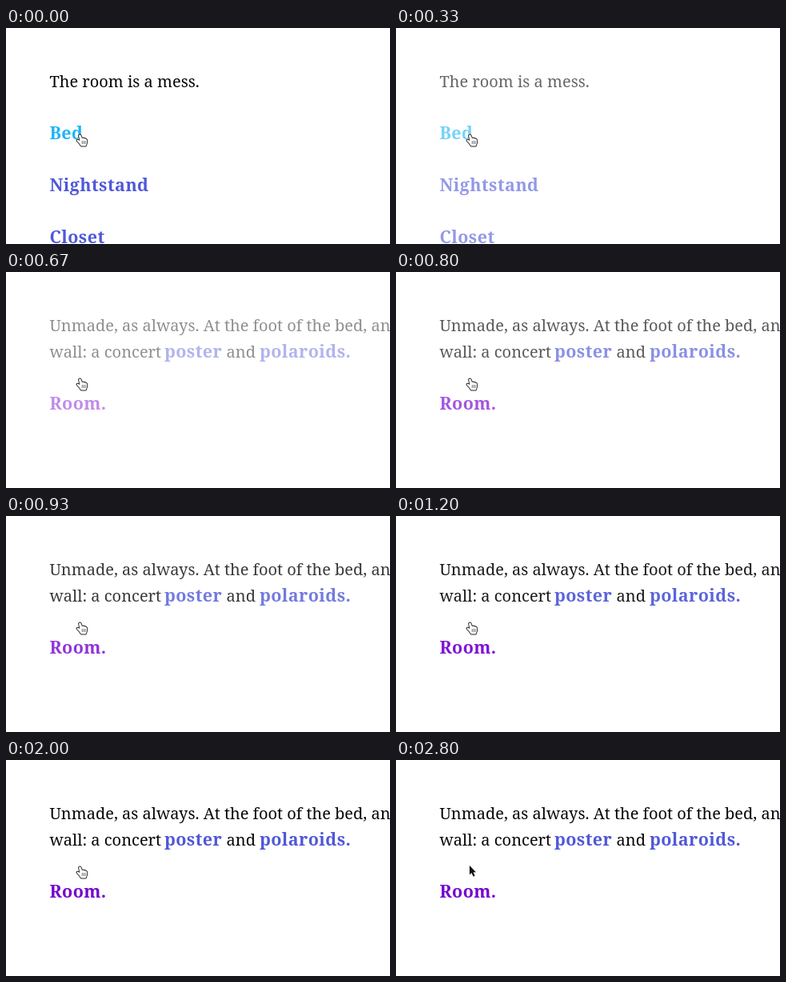
An HTML page with a canvas for the animation above (3.07 s loop, 480 by 270 pixels).

```html
<!DOCTYPE html>
<html lang="en">
<head>
<meta charset="utf-8">
<style>
html, body { margin: 0; width: 100%; height: 100%; overflow: hidden; background: #fff; }
canvas { display: block; }
</style>
</head>
<body>
<canvas id="stage" width="480" height="270"></canvas>
<script>
const ctx = document.getElementById("stage").getContext("2d");
const LOOP = 3070, STEP = 1000 / 15;
const BLACK = "#060606", BLUE = "#4f58d8", HOVER = "#1fb4f4", VISITED = "#7400d0";

// Each run: text, x, baseline, colour; coloured runs are bold links.
const roomPage = [
  ["The room is a mess.", 54.5, 74, BLACK],
  ["Bed", 54.5, 139, HOVER],
  ["Nightstand", 54.5, 204, BLUE],
  ["Closet", 54.5, 269, BLUE]
];
const bedPage = [
  ["Unmade, as always. At the foot of the bed, and", 54.5, 74, BLACK],
  ["wall: a concert", 54.5, 107, BLACK],
  ["poster", 198, 107, BLUE],
  ["and", 275.5, 107, BLACK],
  ["polaroids.", 317, 107, BLUE],
  ["Room.", 54.5, 172, VISITED]
];

function drawPage(runs, alpha) {
  ctx.globalAlpha = alpha;
  for (const [text, x, y, color] of runs) {
    const link = color !== BLACK;
    ctx.font = (link ? "bold 21.5px" : "20px") + " 'Noto Serif', serif";
    ctx.letterSpacing = link ? "0.4px" : "0px";
    ctx.fillStyle = color;
    ctx.fillText(text, x, y);
  }
  ctx.globalAlpha = 1;
}

function drawShape(d, fill, stroke, width) {
  const path = new Path2D(d);
  ctx.fillStyle = fill;
  ctx.strokeStyle = stroke;
  ctx.lineWidth = width;
  ctx.lineJoin = "round";
  ctx.stroke(path);
  ctx.fill(path);
}

function drawHand() {
  drawShape("M91 134.5Q92 132.5 93.7 134.3L95 138Q96.3 137 97.3 138.2Q98.8 137.4 99.5 138.8Q101 138.5 101.2 140.5L101 144L99.8 147.5H93.8L91.3 143.8L88.6 141.2Q88 139.4 90 139.7L92.3 141Z",
    "#fff", "#222", 1.8);
  drawShape("M95.3 141V145M97.3 141V145M99.2 141V145", "#fff", "#555", 0.8);
}

function drawArrow() {
  drawShape("M92 132V143.2L94.5 140.9L96.6 145.6L98.6 144.7L96.5 140.2H99.8Z", "#111", "#ddd", 1);
}

function render(now) {
  const time = now % LOOP;
  const t = Math.floor((time + 4) / STEP) * STEP;
  ctx.fillStyle = "#fff";
  ctx.fillRect(0, 0, 480, 270);
  if (t < 505) {
    drawPage(roomPage, Math.min(1, Math.max(0, (500 - t) / 270)));
  } else {
    drawPage(bedPage, t > 1500 ? 1 : 1 - Math.exp((505 - t) / 270));
  }
  time < 2800 ? drawHand() : drawArrow();
  requestAnimationFrame(tick);
}

let start;
function tick(now) {
  start ??= now;
  render(now - start);
}
requestAnimationFrame(tick);
</script>
</body>
</html>
```
